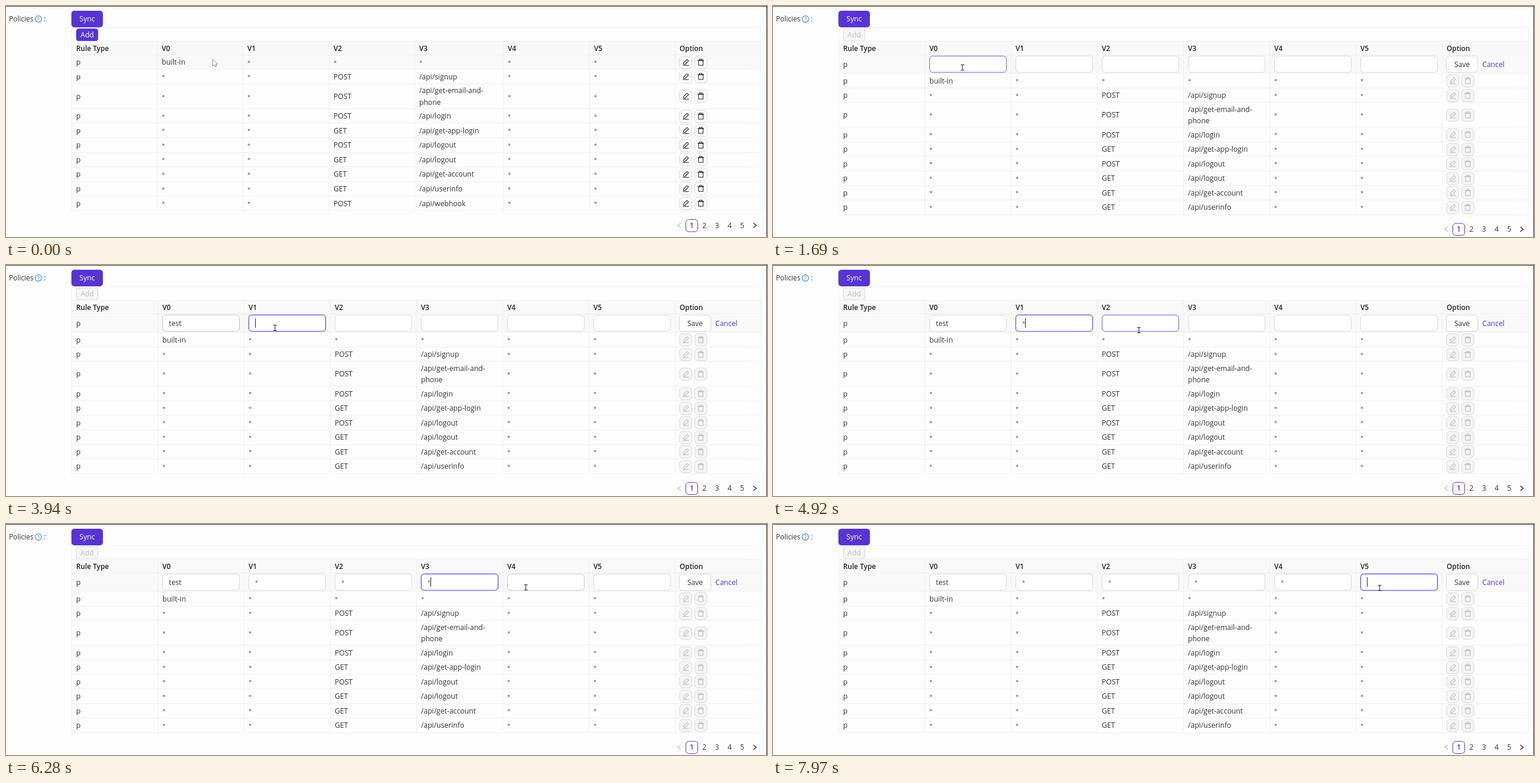
An HTML page with a canvas that plays this animation: 1280x390 px, repeating every 8 s.

```html
<!DOCTYPE html>
<html lang="en">
<head>
<meta charset="utf-8">
<title>Policies table</title>
<style>
  html, body { margin: 0; width: 100%; height: 100%; overflow: hidden; background: #fdfdfd; }
  canvas { display: block; }
</style>
</head>
<body>
<canvas id="stage" width="1280" height="390"></canvas>
<script>
const ctx = document.getElementById('stage').getContext('2d');
const LOOP = 8000, ADDED = 890, BLINK = 500, FADE = 200;
const FONT = '"Open Sans", "Noto Sans", sans-serif';
const PURPLE = [87, 52, 211], LILAC = [124, 94, 221], GREY = [217, 217, 217];
const PALE = [245, 245, 245], WHITE = [255, 255, 255], MUTED = [191, 191, 191];
const INK = '#333', LINE = '#f0f0f0', SHADE = '#f9f9f9';
const LEFT = 110, WIDTH = 1160, ROW = 24.55, TEXT_LINE = 19.8;
const INPUT = { x: 263, y: 84, step: 145, w: 130, h: 28 };
const ADD = { x: 118, y: 38, w: 37, h: 21 };

const HEAD = ['Rule Type', 'V0', 'V1', 'V2', 'V3', 'V4', 'V5', 'Option'];
const RULES = [
  'p built-in * * * * *', 'p * * POST /api/signup * *',
  'p * * POST /api/get-email-and-|phone * *', 'p * * POST /api/login * *',
  'p * * GET /api/get-app-login * *', 'p * * POST /api/logout * *',
  'p * * GET /api/logout * *', 'p * * GET /api/get-account * *',
  'p * * GET /api/userinfo * *', 'p * * POST /api/webhook * *'
].map(rule => rule.split(' '));

// For each input: time of the click, time the pointer leaves, resting point
const FIELDS = [
  { focus: 1790, leave: 3230, x: 322, y: 105 },
  { focus: 3770, leave: 4530, x: 452, y: 106 },
  { focus: 4980, leave: 5320, x: 615, y: 110 },
  { focus: 5750, leave: 6090, x: 744, y: 108 },
  { focus: 6400, leave: 6730, x: 875, y: 107 },
  { focus: 6965, leave: LOOP, x: 1020, y: 108 }
];
FIELDS.forEach((f, i) => {
  f.left = INPUT.x + i * INPUT.step;
  f.blur = f.leave < LOOP ? FIELDS[i + 1].focus : LOOP;
  const last = f.leave - 50, word = i ? '*' : 'test';
  f.keys = f.leave < LOOP
    ? [...word].map((_, n) => ({ at: last - 215 * (word.length - 1 - n), text: word.slice(0, n + 1) }))
    : [];
});

const clamp = v => Math.max(0, Math.min(1, v));
const ramp = (t, from, length) => clamp((t - from) / length);
const mix = (a, b, k) => a.map((v, i) => v + (b[i] - v) * k);
const rgb = c => `rgb(${c.map(Math.round).join()})`;
const inside = (p, b) => p.x >= b.x && p.x <= b.x + b.w && p.y >= b.y && p.y <= b.y + b.h;

// The pointer glides to Add, then from input to input
function pointer(t) {
  const p = { x: 348, y: 90 };
  const glide = (to, from, length) => {
    const r = ramp(t, from, length), k = r * r * (3 - 2 * r);
    p.x += (to.x - p.x) * k;
    p.y += (to.y - p.y) * k;
  };
  glide({ x: 150, y: 51 }, 50, 770);
  FIELDS.forEach((f, i) => {
    const from = i ? FIELDS[i - 1].leave : 1050;
    glide(f, from, (f.focus - from) * (i ? .65 : .95));
  });
  return p;
}

// Strength of a hover that fades in over the last 150 ms
function hover(t, area) {
  const steps = 6;
  let n = 0;
  for (let k = 0; k < steps; k++) n += inside(pointer(t - k * 30), area);
  return (n / steps) ** 2;
}

function rect(x, y, w, h, color) {
  ctx.fillStyle = color;
  ctx.fillRect(x, y, w, h);
}

function box(x, y, w, h, r, fill, edge) {
  ctx.beginPath();
  ctx.roundRect(x, y, w, h, r);
  ctx.fillStyle = fill;
  ctx.fill();
  if (!edge) return;
  ctx.strokeStyle = edge;
  ctx.lineWidth = 1;
  ctx.stroke();
}

function circle(x, y, r, edge, width, fill) {
  ctx.beginPath();
  ctx.arc(x, y, r, 0, 2 * Math.PI);
  if (fill) { ctx.fillStyle = fill; ctx.fill(); }
  ctx.strokeStyle = edge;
  ctx.lineWidth = width;
  ctx.stroke();
}

function line(color, width, ...points) {
  ctx.beginPath();
  for (const [x, y] of points) ctx.lineTo(x, y);
  ctx.strokeStyle = color;
  ctx.lineWidth = width;
  ctx.stroke();
}

function at(x, y, paint) {
  ctx.save();
  ctx.translate(x, y);
  paint();
  ctx.restore();
}

// Text centred vertically on y
function label(s, x, y, { color = INK, size = 12.1, weight = 400, align = 'left' } = {}) {
  const star = s === '*';
  ctx.font = `${weight} ${star ? 9.5 : size}px ${FONT}`;
  ctx.textAlign = align;
  ctx.fillStyle = star ? '#555' : color;
  ctx.fillText(s, x, y + (star ? 3.8 : 4.3));
}

function pencil(ink) {
  line(ink, 1.1, [-5, 5.3], [5.5, 5.3]);
  ctx.rotate(-Math.PI / 4);
  line(ink, 1.1, [-5, 0], [-3, -1.8], [5, -1.8], [5, 1.8], [-3, 1.8], [-5, 0]);
}

function bin(ink) {
  line(ink, 1.1, [-5.5, -3.2], [5.5, -3.2]);
  ctx.strokeRect(-2.3, -5.2, 4.6, 2);
  ctx.strokeRect(-3.8, -3.2, 7.6, 8.2);
}

function iconButtons(x, y, off) {
  const ink = off ? rgb(MUTED) : '#2b2b2b';
  [pencil, bin].forEach((icon, i) => at(x + i * 25.5, y, () => {
    box(.5, -10, 20.5, 20.5, 5, off ? rgb(PALE) : '#fff', rgb(GREY));
    ctx.translate(10.7, 0);
    icon(ink);
  }));
}

function topBar(t) {
  const blue = '#2f86e0';
  label('Policies', 5, 22, { size: 11.8 });
  circle(54.5, 22, 5.4, blue, 1.1);
  label('?', 54.5, 21.5, { color: blue, size: 9, align: 'center' });
  label(':', 63.5, 22);
  box(LEFT, 8, 53, 28, 5, rgb(PURPLE));
  label('Sync', 136.5, 22, { color: '#fff', align: 'center' });

  const off = ramp(t, 985, FADE);
  const live = mix(PURPLE, LILAC, hover(t, ADD));
  box(ADD.x + .5, ADD.y + .5, ADD.w - 1, ADD.h - .5, 4,
    rgb(mix(live, PALE, off)), rgb(mix(live, GREY, off)));
  label('Add', 136.5, 49, { color: rgb(mix(WHITE, MUTED, off)), align: 'center' });
}

function input(t, f, y) {
  const lit = ramp(t, f.focus, FADE) * (1 - ramp(t, f.blur, FADE));
  const area = { ...INPUT, x: f.left };
  const edge = mix(mix(GREY, LILAC, hover(t, area)), PURPLE, lit * .85);
  if (lit) box(f.left - 1, INPUT.y - 1, INPUT.w + 2, INPUT.h + 2, 6, `rgba(87,52,211,${.2 * lit})`);
  box(f.left + .5, INPUT.y + .5, INPUT.w - 1, INPUT.h - .5, 5, '#fff', rgb(edge));

  const key = f.keys.filter(k => k.at <= t).pop() || { at: f.focus, text: '' };
  label(key.text, f.left + 11, y);
  const on = (t - key.at) % (2 * BLINK) < BLINK;
  if (on && t >= f.focus && t < f.blur)
    rect(Math.round(f.left + 11 + ctx.measureText(key.text).width), 90, 1, 16, '#222');
}

function editRow(t) {
  const y = 98.5;
  label('p', 118, y);
  for (const f of FIELDS) input(t, f, y);
  box(1132.5, INPUT.y + .5, 53, 27.5, 5, '#fff', rgb(GREY));
  label('Save', 1159, y, { align: 'center' });
  label('Cancel', 1193, y, { color: rgb(PURPLE) });
}

function table(t, p) {
  const added = t >= ADDED;
  const cols = Array.from({ length: 9 }, (_, i) =>
    Math.floor(LEFT + (added ? i * 145 : i * 144.4 + (i > 4 ? 4.6 : 0))));
  let y = 82.3;

  // Shades the row under the pointer, rules it off and returns its middle
  const nextRow = h => {
    const top = Math.floor(y), over = p.y >= y && p.y < y + h;
    y += h;
    const end = Math.floor(y);
    if (over) rect(LEFT, top + 1, WIDTH, end - top - 1, SHADE);
    rect(LEFT, end, WIDTH, 1, LINE);
    return y - h / 2;
  };

  rect(LEFT, 59, WIDTH, 23, SHADE);
  HEAD.forEach((s, i) => label(s, cols[i] + 8, 72, { weight: 600, size: 11.8, color: '#222' }));
  for (const top of [36, 59, 82]) rect(LEFT, top, WIDTH, 1, LINE);
  if (added) { nextRow(31.4); editRow(t); }

  for (const cells of RULES.slice(0, added ? 9 : 10)) {
    const tall = cells.some(s => s.includes('|'));
    const mid = nextRow(tall ? 42 : ROW);
    cells.forEach((s, c) => s.split('|').forEach((part, k) =>
      label(part, cols[c] + 8, mid + .3 + (s.includes('|') ? (k - .5) * TEXT_LINE : 0))));
    iconButtons(cols[7] + 7.5, Math.round(mid), added);
  }
  cols.forEach((x, i) => {
    const top = i % 8 ? 59 : 36;
    rect(x, top, 1, Math.floor(y) - top, LINE);
  });
}

function pager(y) {
  const arrow = (x, dir, color) => line(color, 1.2, [x - 2.5 * dir, y - 4], [x + 2.5 * dir, y], [x - 2.5 * dir, y + 4]);
  arrow(1132.5, -1, rgb(MUTED));
  box(1143.5, y - 10, 20, 20.5, 5, '#fff', rgb(PURPLE));
  for (let n = 1; n <= 5; n++)
    label(String(n), 1132.3 + n * 21.2, y,
      { align: 'center', color: n === 1 ? rgb(PURPLE) : INK, weight: n === 1 ? 600 : 400 });
  arrow(1259.5, 1, '#222');
}

function barred() {
  const red = '#c01825';
  circle(0, 0, 4.4, red, 2, '#fff');
  line(red, 2, [-3, -3], [3, 3]);
}

function hand() {
  box(-4, 5, 10, 8, 3, '#fff', '#222');
  box(-1.5, 0, 3, 9, 1.5, '#fff', '#222');
}

function beam() {
  line('#222', 1, [.5, -4.5], [.5, 4.5]);
  for (const y of [-4.5, 4.5]) line('#222', 1, [-2.5, y], [3.5, y]);
}

function arrowHead() {
  ctx.fillStyle = '#fff';
  line('#222', 1, [0, 0], [0, 11], [2.5, 8.8], [4.3, 12.5], [6, 11.7], [4.4, 8.2], [7.6, 7.8], [0, 0]);
  ctx.fill();
}

function cursor(t, p) {
  const added = t >= ADDED;
  const onField = added && FIELDS.some(f => inside(p, { ...INPUT, x: f.left }));
  at(p.x, p.y, inside(p, ADD) ? (added ? barred : hand) : onField ? beam : arrowHead);
}

function draw(t) {
  const p = pointer(t);
  rect(0, 0, 1280, 390, '#fdfdfd');
  topBar(t);
  table(t, p);
  pager(t < ADDED ? 370.5 : 377);
  rect(0, 0, 1280, 1, '#3c3c3c');
  rect(1279, 0, 1, 390, '#3c3c3c');
  cursor(t, p);
}

const start = performance.now();
function tick() {
  draw((performance.now() - start) % LOOP);
  requestAnimationFrame(tick);
}
tick();
</script>
</body>
</html>
```
